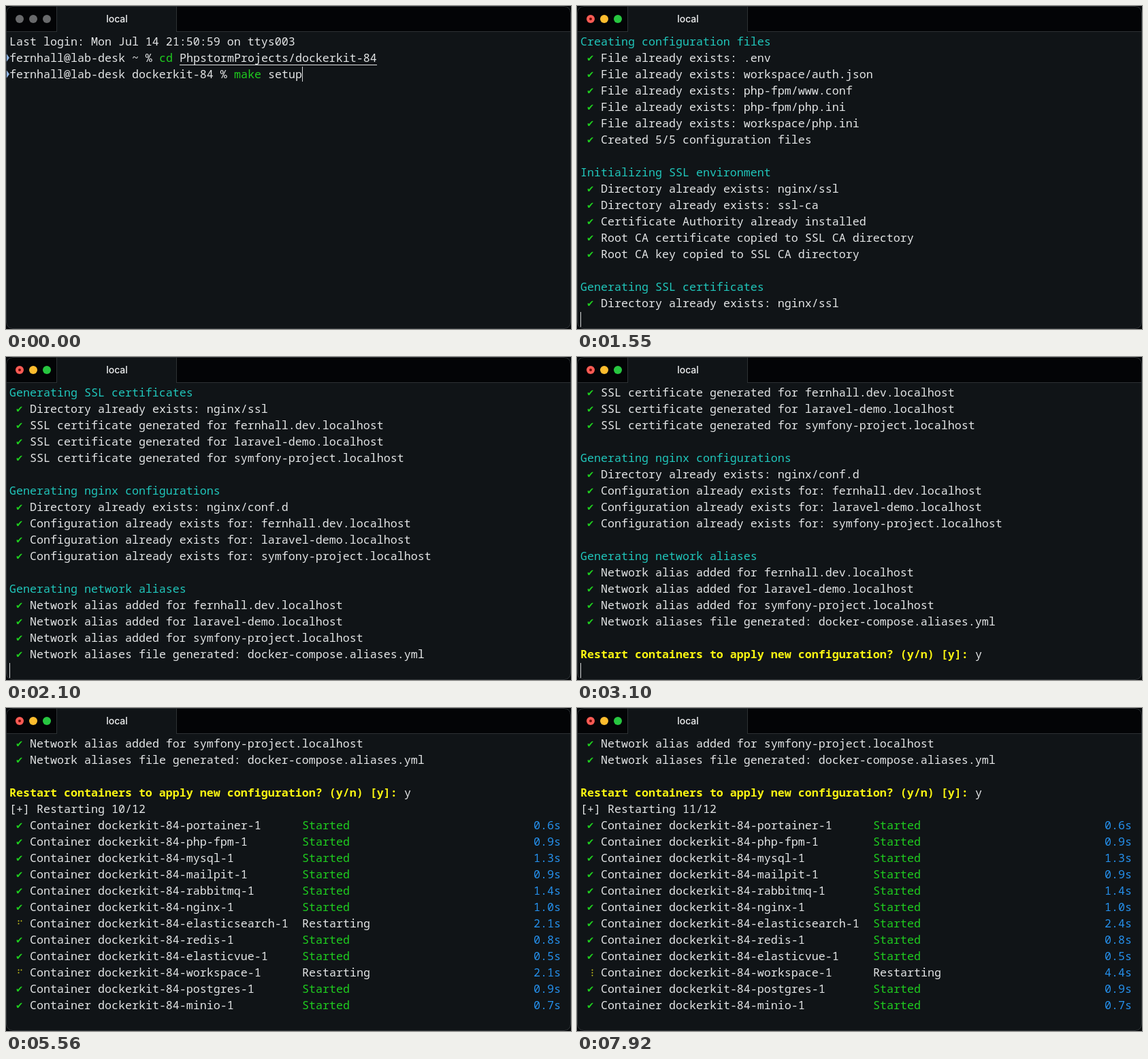
These frames come from a looping animation (830 px wide and 474 px high, 8000 ms). An HTML page:

```html
<!DOCTYPE html>
<html lang="en">
<head>
<meta charset="utf-8">
<title>Terminal</title>
<style>
html, body { margin: 0; width: 100%; height: 100%; overflow: hidden; background: #07090c; }
#win {
  position: absolute; left: 0; top: 0; width: 830px; height: 474px; box-sizing: border-box;
  border-radius: 10px; overflow: hidden; background: #101417;
}
#win::after {
  content: ""; position: absolute; inset: 0; border: 1px solid #34383b; border-radius: 10px;
}
.bar { position: absolute; top: 0; height: 37px; background: #030406; border-bottom: 1px solid #2d3134; }
.bar.l { left: 0; width: 74px; border-right: 1px solid #2d3134; }
.bar.r { left: 250px; right: 0; border-left: 1px solid #2d3134; }
.title {
  position: absolute; left: 75px; width: 176px; top: 7px; line-height: 24px; text-align: center;
  font: 500 14px/24px Inter, sans-serif; color: #f1f2f3;
}
.light { position: absolute; top: 13px; width: 12px; height: 12px; border-radius: 50%; background: #68696b; }
#busy { position: absolute; left: 18px; top: 17px; width: 4px; height: 4px; border-radius: 50%; background: #6d0905; }
#rows { position: absolute; left: 5px; top: 40px; }
.row { position: absolute; left: 0; width: 820px; height: 24px; }
.row span {
  position: absolute; top: 0; white-space: pre; color: #e3e5e6;
  font: 400 16.6667px/24px "Noto Sans Mono", "DejaVu Sans Mono", monospace;
  font-variant-ligatures: none;
}
.row .green { color: #1fcd1f; }
.row .cyan { color: #20c6bb; }
.row .blue { color: #2590ec; }
.row .ask { color: #fbf612; font-weight: 700; }
.row .check { color: #1fcd1f; font: 15.5px/24px "DejaVu Sans Mono", "DejaVu Sans", monospace; }
.row .path { border-bottom: 1px solid #e3e5e6; height: 22px; }
.row svg { position: absolute; left: 10px; top: 0; fill: #cfc81c; }
.row .mark {
  position: absolute; left: -5px; top: 5px; width: 5px; height: 14px;
  background: #8fb3e2; clip-path: polygon(0 0, 100% 50%, 0 100%);
}
#cursor { position: absolute; width: 1px; height: 22px; background: #d6d8d9; }
</style>
</head>
<body>
<div id="win">
  <div class="bar l"></div>
  <div class="bar r"></div>
  <div class="title">local</div>
  <div class="light" style="left:14px"></div>
  <div class="light" style="left:34px"></div>
  <div class="light" style="left:54px"></div>
  <div id="busy"></div>
  <div id="rows"></div>
  <div id="cursor"></div>
</div>
<script>
const LOOP = 8000, ROWS = 18, COL = 10, LINE = 24;
const FOCUS = 270, BLINK_OFF = 640, BLINK_ON = 1180, RUN = 1370;
const ASK = 2190, ANSWER = 2910, ENTER = 3100, RESTART = 3550;

const span = (col, text, cls = '') => `<span class="${cls}" style="left:${col * COL}px">${text}</span>`;
const head = text => span(0, text, 'cyan');
const check = span(1, '✔', 'check');
const ok = text => check + span(3, text);
const mark = '<i class="mark"></i>';

const user = 'fernhall', host = 'lab-desk';
const sites = [user + '.dev', 'laravel-demo', 'symfony-project'].map(s => s + '.localhost');
const forSites = text => sites.map(s => ok(text + ' ' + s));

const log = [
  span(0, 'Last login: Mon Jul 14 21:50:59 on ttys003'),
  mark + span(0, `${user}@${host} ~ %`) + span(22, 'cd', 'green') + span(25, 'PhpstormProjects/dockerkit-84', 'path'),
  mark + span(0, `${user}@${host} dockerkit-84 %`) + span(33, 'make', 'green') + span(38, 'setup'),
  head('Creating configuration files'),
  ...['.env', 'workspace/auth.json', 'php-fpm/www.conf', 'php-fpm/php.ini', 'workspace/php.ini']
    .map(f => ok('File already exists: ' + f)),
  ok('Created 5/5 configuration files'),
  '',
  head('Initializing SSL environment'),
  ok('Directory already exists: nginx/ssl'),
  ok('Directory already exists: ssl-ca'),
  ok('Certificate Authority already installed'),
  ok('Root CA certificate copied to SSL CA directory'),
  ok('Root CA key copied to SSL CA directory'),
  '',
  head('Generating SSL certificates'),
  ok('Directory already exists: nginx/ssl'),
  ...forSites('SSL certificate generated for'),
  '',
  head('Generating nginx configurations'),
  ok('Directory already exists: nginx/conf.d'),
  ...forSites('Configuration already exists for:'),
  '',
  head('Generating network aliases'),
  ...forSites('Network alias added for'),
  ok('Network aliases file generated: docker-compose.aliases.yml'),
  ''
];

// [time, finished lines]
const printed = [
  [0, 2], [RUN, 10], [1460, 18], [1550, 20], [1640, 21], [1730, 22], [1820, 23],
  [1920, 27], [2010, 31], [2100, 35], [ASK, 36]
];

// container name and start duration in tenths of a second
const containers = [
  ['portainer', 6], ['php-fpm', 9], ['mysql', 13], ['mailpit', 9], ['rabbitmq', 14], ['nginx', 10],
  ['elasticsearch', 24], ['redis', 8], ['elasticvue', 5], ['workspace', 99], ['postgres', 9], ['minio', 7]
];

// spinner steps as dot numbers: 1-3 left column, 4-6 right column
const spin = ['124', '145', '1456', '456', '3456', '356', '236', '1236', '123', '1234'];

function spinner(tick) {
  const dots = [...spin[tick % 10]].map(n => {
    const i = n - 1;
    return `<circle cx="${i < 3 ? 3.5 : 7.5}" cy="${8.5 + i % 3 * 4}" r="1"/>`;
  });
  return `<svg width="10" height="24">${dots.join('')}</svg>`;
}

function restartLines(t) {
  const frame = Math.floor((t + 4) / 91.04);
  const tick = Math.max(0, Math.floor((frame * 1000 / 11 - 3540) / 100));
  const now = tick + 1;
  const done = containers.filter(c => c[1] < now).length;
  const lines = containers.map(([name, end]) => {
    const up = end < now;
    return (up ? check : spinner(tick)) +
      span(3, `Container dockerkit-84-${name}-1`) +
      span(43, up ? 'Started' : 'Restarting', up ? 'green' : '') +
      span(77, (Math.min(end, now) / 10).toFixed(1) + 's', 'blue');
  });
  return [span(0, `[+] Restarting ${done}/${containers.length}`), ...lines];
}

// All lines up to the one holding the cursor, and the cursor column
function screen(t) {
  const count = printed.filter(p => p[0] <= t).pop()[1];
  const lines = log.slice(0, count);
  let col = 0;
  if (t < RUN) {
    lines.push(log[2]);
    col = 43;
  } else if (t >= ASK) {
    const answered = t >= ANSWER;
    lines.push(span(0, 'Restart containers to apply new configuration? (y/n) [y]:', 'ask') +
      (answered ? span(58, 'y') : ''));
    col = answered ? 59 : 58;
    if (t >= ENTER) {
      if (t >= RESTART) lines.push(...restartLines(t));
      lines.push('');
      col = 0;
    }
  } else {
    lines.push('');
  }
  return { lines, col };
}

const rowBox = document.getElementById('rows');
const rows = Array.from({ length: ROWS }, (_, i) => {
  const row = document.createElement('div');
  row.className = 'row';
  row.style.top = i * LINE + 'px';
  rowBox.append(row);
  return { el: row, html: '' };
});
const lights = [...document.querySelectorAll('.light')];
const lightColors = ['#fc5b54', '#fdbc2e', '#27c640'];
const cursor = document.getElementById('cursor');
const busy = document.getElementById('busy');

function render(t) {
  const { lines, col } = screen(t);
  const view = lines.slice(-ROWS);
  rows.forEach((row, i) => {
    const html = view[i] || '';
    if (html !== row.html) row.el.innerHTML = row.html = html;
  });
  lights.forEach((el, i) => el.style.background = t < FOCUS ? '#68696b' : lightColors[i]);
  busy.style.display = t < RUN ? 'none' : 'block';
  const hidden = t >= RESTART || (t >= BLINK_OFF && t < BLINK_ON);
  cursor.style.display = hidden ? 'none' : 'block';
  cursor.style.left = 5 + col * COL + 'px';
  cursor.style.top = 41 + (view.length - 1) * LINE + 'px';
}

const start = performance.now();
function loop() {
  render((performance.now() - start) % LOOP);
  requestAnimationFrame(loop);
}
render(0);
requestAnimationFrame(loop);
</script>
</body>
</html>
```
